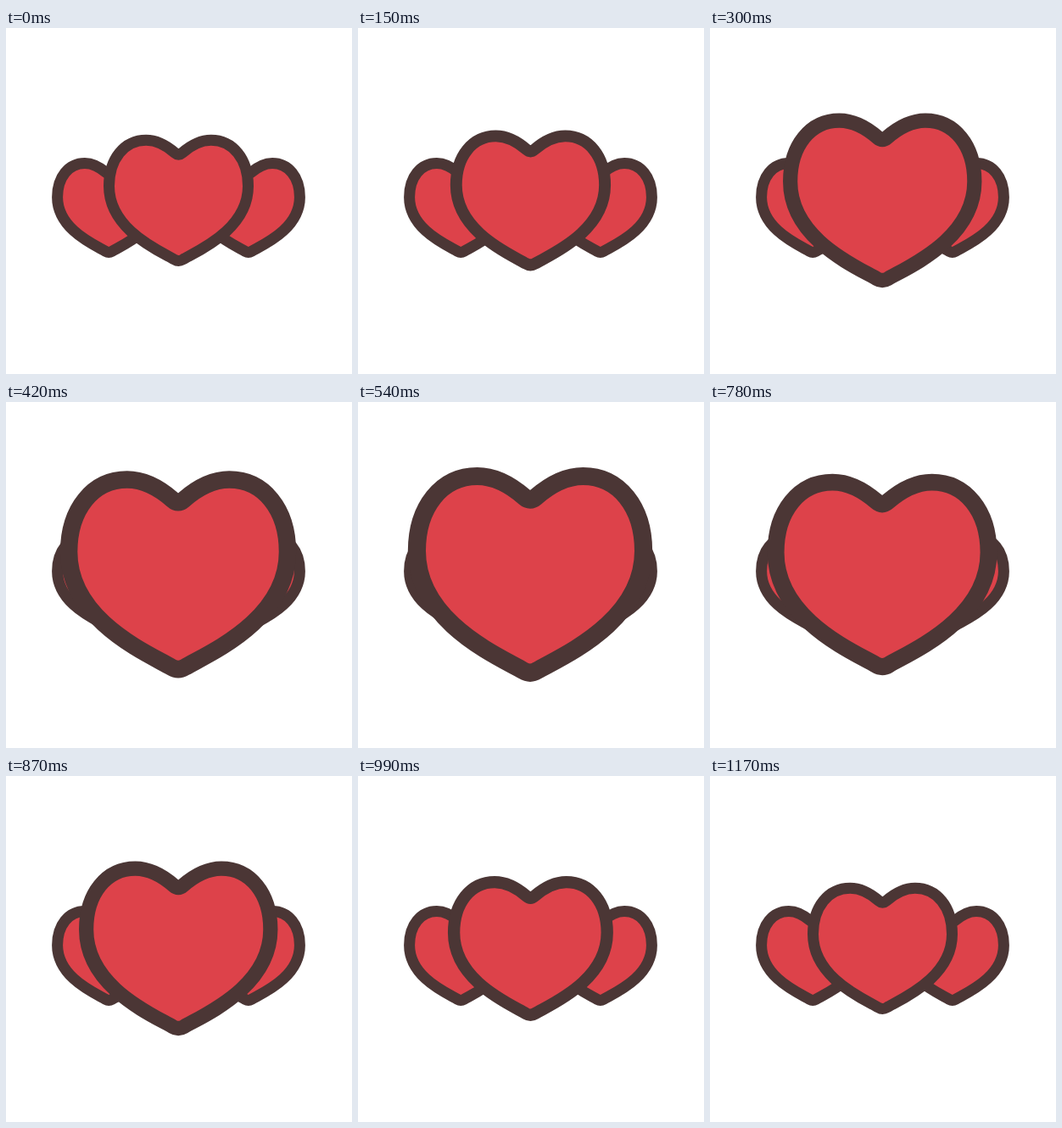
Recreate the animation shown at these times as an HTML page with a canvas. Size 408 by 408 pixels, loop 1.23 s.

```html
<!DOCTYPE html>
<html lang="en">
<head>
<meta charset="utf-8">
<title>Beating hearts</title>
<style>
  html, body { margin: 0; width: 100%; height: 100%; overflow: hidden; background: #fff; }
  canvas { display: block; }
</style>
</head>
<body>
<canvas id="stage" width="408" height="408"></canvas>
<script>
const ctx = document.getElementById('stage').getContext('2d');
const LOOP = 1230, STEP = 30, LAST = 39;
const CENTER = 203.5, LINE = 13, GROWTH = 0.64, DRIFT = -0.8;

// Growth curve of the beat: [step, amount, slope per step]
const BEAT = [
  [0, 0, 0.016], [3, 0.053, 0.02], [5, 0.108, 0.04], [10, 0.507, 0.105],
  [14, 0.894, 0.045], [16, 0.946, 0.02], [19, 1, 0.017]
];

function beat(step) {
  const i = Math.max(1, BEAT.findIndex(key => key[0] >= step));
  const [x0, y0, m0] = BEAT[i - 1];
  const [x1, y1, m1] = BEAT[i];
  const d = x1 - x0, u = (step - x0) / d, v = 1 - u;
  return v * v * ((1 + 2 * u) * y0 + u * d * m0)
       + u * u * ((3 - 2 * u) * y1 - v * d * m1);
}

// Heart around its centre, with a softly rounded notch and tip
const heart = new Path2D(`
  M4 -56 C11 -62.1 23 -71.2 38.3 -71.2
  C64 -71.2 82 -49 82 -17
  C82 34.5 22 59.5 5 69.5
  Q0 72.5 -5 69.5
  C-22 59.5 -82 34.5 -82 -17
  C-82 -49 -64 -71.2 -38.3 -71.2
  C-23 -71.2 -11 -62.1 -4 -56
  Q0 -52.5 4 -56 Z`);

function drawHeart(x, y, scale, line) {
  ctx.save();
  ctx.translate(x, y);
  ctx.scale(scale, scale);
  ctx.lineWidth = line / scale;
  ctx.lineJoin = 'round';
  ctx.fillStyle = '#dd424a';
  ctx.strokeStyle = '#4b3635';
  ctx.fill(heart);
  ctx.stroke(heart);
  ctx.restore();
}

function draw(now) {
  const step = Math.min(LAST, Math.floor((now % LOOP) / STEP));
  const growth = GROWTH * beat(Math.min(step, LAST - step));
  const scale = 1 + growth;
  ctx.fillStyle = '#fff';
  ctx.fillRect(0, 0, 408, 408);
  for (const side of [-1, 1]) drawHeart(CENTER + side * 82.3, 212, 0.739, LINE);
  drawHeart(CENTER + DRIFT * growth, CENTER, scale, LINE * scale);
}

const start = performance.now();
function tick() {
  draw(performance.now() - start);
  requestAnimationFrame(tick);
}
tick();
</script>
</body>
</html>
```
